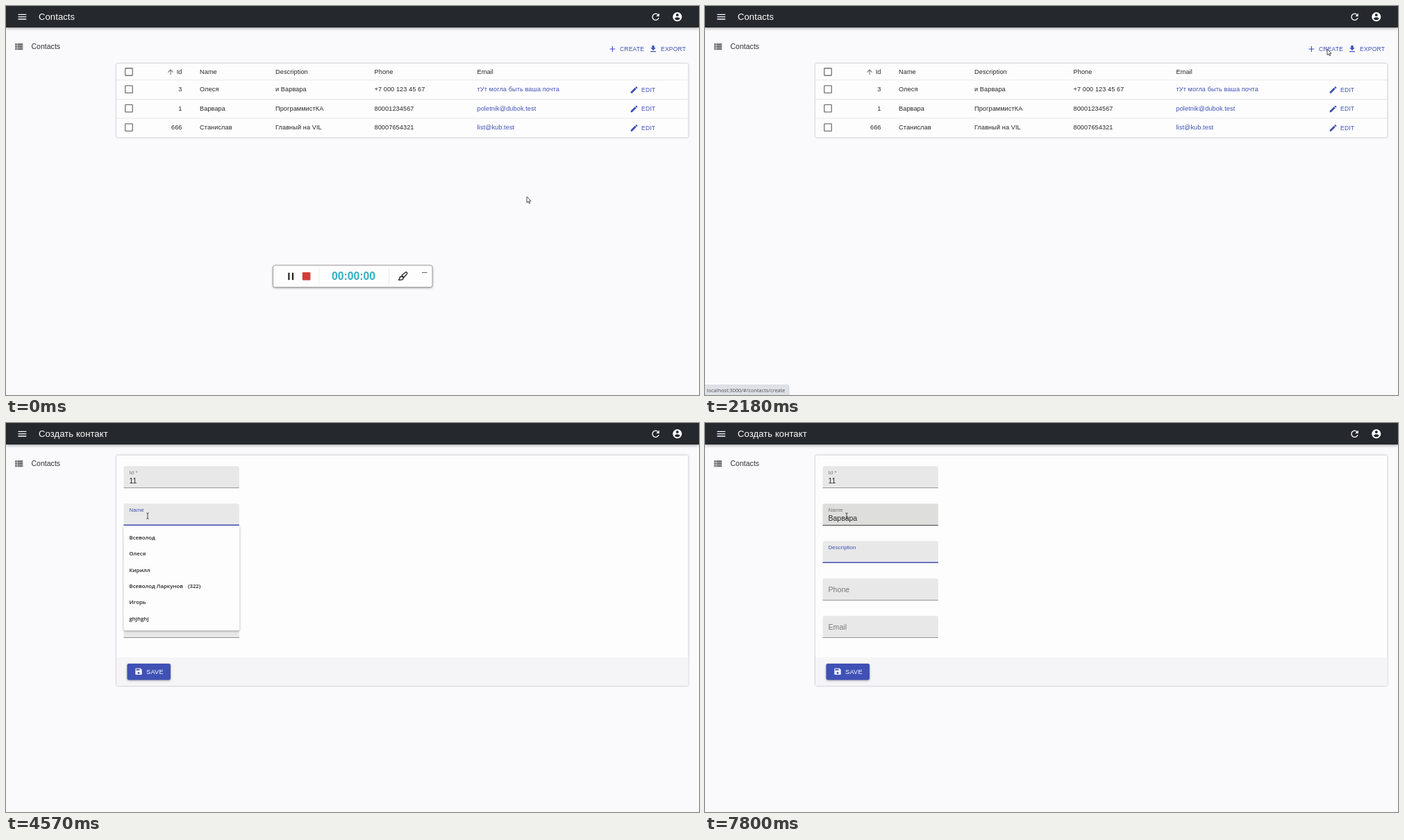
An HTML page for the animation above (8 s loop, 998 by 561 pixels).

```html
<!DOCTYPE html>
<html lang="ru">
<head>
<meta charset="utf-8">
<title>Contacts</title>
<style>
  html, body { margin: 0; height: 100%; overflow: hidden; background: #fafafc; }
  svg { display: block; width: 100vw; height: 100vh; font-family: "Liberation Sans", Arial, sans-serif; }
  text { white-space: pre; }
  .card { filter: drop-shadow(0 .7px .8px rgba(0,0,0,.38)); }
  .pop { filter: drop-shadow(0 1px 1.5px rgba(0,0,0,.35)); }
  .ui { font-family: "Open Sans", "Noto Sans", sans-serif; }
</style>
</head>
<body>
<svg id="stage" viewBox="0 0 998 561" preserveAspectRatio="none"></svg>
<script>
const LOOP = 8000, BLUE = '#3f51b5', INK = '#262626';

const ICONS = {
  menu: 'M3 18h18v-2H3zM3 13h18v-2H3zM3 6v2h18V6z',
  refresh: 'M17.65 6.35C16.2 4.9 14.21 4 12 4c-4.42 0-7.99 3.58-7.99 8s3.57 8 7.99 8c3.73 0 6.84-2.55 7.73-6h-2.08c-.82 2.33-3.04 4-5.65 4-3.31 0-6-2.69-6-6s2.69-6 6-6c1.66 0 3.14.69 4.22 1.78L13 11h7V4z',
  account: 'M12 2a10 10 0 1 0 0 20a10 10 0 1 0 0-20zm0 3a3 3 0 1 1 0 6a3 3 0 1 1 0-6zm0 14.2c-2.5 0-4.71-1.28-6-3.22.03-1.99 4-3.08 6-3.08s5.97 1.09 6 3.08c-1.29 1.94-3.5 3.22-6 3.22z',
  list: 'M4 14h4v-4H4zM4 19h4v-4H4zM4 9h4V5H4zM9 14h12v-4H9zM9 19h12v-4H9zM9 5v4h12V5z',
  edit: 'M3 17.25V21h3.75L17.81 9.94l-3.75-3.75zM20.71 7.04c.39-.39.39-1.02 0-1.41l-2.34-2.34c-.39-.39-1.02-.39-1.41 0l-1.83 1.83 3.75 3.75z',
  add: 'M19 13h-6v6h-2v-6H5v-2h6V5h2v6h6z',
  download: 'M19 9h-4V3H9v6H5l7 7zM5 18v2h14v-2z',
  save: 'M17 3H5c-1.11 0-2 .9-2 2v14c0 1.1.89 2 2 2h14c1.1 0 2-.9 2-2V7zm-5 16a3 3 0 1 1 0-6a3 3 0 1 1 0 6zm3-10H5V5h10z',
  box: 'M19 5v14H5V5h14m0-2H5c-1.1 0-2 .9-2 2v14c0 1.1.9 2 2 2h14c1.1 0 2-.9 2-2V5c0-1.1-.9-2-2-2z',
  up: 'M4 12l1.41 1.41L11 7.83V20h2V7.83l5.58 5.59L20 12l-8-8z'
};

const icon = (name, cx, cy, size, fill) =>
  `<path d="${ICONS[name]}" fill="${fill}" fill-rule="evenodd" transform="translate(${cx - size / 2} ${cy - size / 2}) scale(${size / 24})"/>`;
const rect = (x, y, w, h, fill, more = '') =>
  `<rect x="${x}" y="${y}" width="${w}" height="${h}" fill="${fill}" ${more}/>`;
const text = (x, y, size, fill, str, more = '') =>
  `<text x="${x}" y="${y}" font-size="${size}" fill="${fill}" ${more}>${str}</text>`;
const cell = (x, y, str, fill = INK, more = '') =>
  text(x, y, 9.17, fill, str, 'letter-spacing=".09" ' + more);
const button = (x, y, str) => text(x, y, 8.53, BLUE, str, 'letter-spacing=".2"');

const COLUMNS = [279, 388, 530.5, 678.5];
const ROWS = [
  [3, 'Олеся', 'и Варвара', '+7 000 123 45 67', 'тУт могла быть ваша почта'],
  [1, 'Варвара', 'ПрограммистКА', '80001234567', 'poletnik@dubok.test'],
  [666, 'Станислав', 'Главный на VIL', '80007654321', 'list@kub.test']
];
const rowTop = i => 107 + 27.6 * i;

function line(y, id, name, cells, linkFill) {
  return icon('box', 177, y, 15.75, '#757575') +
    cell(253.5, y + 3.1, id, INK, 'text-anchor="end"') +
    cells.map((s, i) => cell(COLUMNS[i], y + 3.1, s, i === 3 ? linkFill : INK)).join('');
}

function tableView() {
  const rows = ROWS.map(([id, ...cells], i) => {
    const y = 120 + 27.5 * i;
    return rect(159, rowTop(i), 823.5, 27.4, '#f4f4f5', `id="row${i}"`) +
      rect(159, rowTop(i) - .6, 823.5, .8, '#e2e2e3') +
      line(y + .2, id, '', cells, BLUE) +
      icon('edit', 904.6, y + .9, 13.1, BLUE) + button(915, y + 3.9, 'EDIT');
  }).join('');
  return icon('add', 873.4, 62, 13.6, BLUE) + button(884, 65, 'CREATE') +
    icon('download', 932, 61.8, 13.1, BLUE) + button(943, 65, 'EXPORT') +
    rect(159, 83, 823.5, 106.5, '#fdfdfe', 'rx="2.6" class="card"') +
    line(95, 'Id', '', ['Name', 'Description', 'Phone', 'Email'], INK) +
    icon('up', 237, 95.2, 11.8, '#6c6c6c') + rows;
}

const FIELDS = ['Id *', 'Name', 'Description', 'Phone', 'Email'];
const fieldTop = i => 62.3 + 54 * i;

function formView() {
  const fields = FIELDS.map((label, i) => {
    const y = fieldTop(i);
    return `<path id="bg${i}" d="M169.5 ${y + 31.5}v-29q0-2.5 2.5-2.5h161.3q2.5 0 2.5 2.5v29z"/>` +
      rect(169.5, y + 30.8, 166.3, .9, '#8b8b8b', `id="base${i}"`) +
      rect(169.5, y + 30.2, 166.3, 1.5, BLUE, `id="focus${i}"`) +
      text(0, 0, 10.5, '#757575', label, `id="label${i}" letter-spacing=".08"`) +
      text(177.5, y + 24.6, 10.5, INK, '', `id="value${i}"`);
  }).join('');
  return rect(159, 46.5, 823.5, 332.5, '#fdfdfe', 'rx="2.6" class="card"') +
    rect(159, 338, 823.5, 41, '#f5f5f7') + fields +
    rect(174.5, 347, 62.5, 23.4, '#d9d9da', 'rx="2.6"') +
    `<g id="saveOn">${rect(174.5, 347, 62.5, 23.4, BLUE, 'rx="2.6" class="pop"')}</g>` +
    `<g id="saveLabel">${icon('save', 191, 358.4, 12.4, 'currentColor')}` +
    `${text(202, 361.6, 9.2, 'currentColor', 'SAVE', 'letter-spacing=".26"')}</g>` +
    rect(0, 0, .8, 12, '#222', 'id="caret"');
}

const HINTS = ['Всеволод', 'Олеся', 'Кирилл', 'Всеволод Ларкунов', 'Игорь', 'ghjhghj'];
const hint = (s, i) => text(177.5, 167.8 + 23.4 * i, 7.8, '#222', s, 'class="ui" font-weight="600"');
const hints = HINTS.map(hint).join('') +
  text(262, 238, 7.8, '#222', '(322)', 'class="ui" font-weight="600"');

const recorder = rect(384.5, 374, 229.5, 31.5, '#fdfdfe', 'rx="3" stroke="#999" stroke-width=".9" class="pop"') +
  rect(406.3, 384.7, 2.2, 10.4, '#222') + rect(411.9, 384.7, 2.2, 10.4, '#222') +
  rect(426.8, 384, 11.6, 11.6, '#d63c3a', 'rx="1"') +
  rect(450.5, 378, .8, 24, '#eee') + rect(551, 378, .8, 24, '#e4e4e4') +
  text(469, 395.4, 15.75, '#2fafc3', '00:00:00', 'font-weight="700"') +
  `<g fill="none" stroke="#222" stroke-width="1.3" stroke-linejoin="round">
     <path d="M570 388.6l5-4.4q1.4-.9 2.3 0t0 2.3l-4.4 5z"/>
     <path d="M569.6 390q-2.6 0-2.6 2.6l-1.4 2.5q4.6.5 6.2-1.3 1-1.6-.2-3z"/></g>` +
  rect(599, 384, 7.5, .9, '#555');

stage.innerHTML =
  rect(0, 0, 998, 561, '#fafafc') +
  rect(0, 0, 998, 31, '#25282c', 'style="filter:drop-shadow(0 1.3px 2px rgba(0,0,0,.4))"') +
  icon('menu', 23.4, 15.7, 15.75, '#fff') + icon('refresh', 935.6, 15.7, 15.75, '#fff') +
  icon('account', 966.8, 15.6, 15.75, '#fff') +
  text(47, 20.4, 13.1, '#fff', '', 'id="title" letter-spacing=".06"') +
  icon('list', 18.4, 58.6, 15.75, '#707070') +
  text(36.4, 62.3, 10.5, '#303030', 'Contacts', 'letter-spacing=".04"') +
  `<g id="table">${tableView()}</g><g id="form">${formView()}</g>
   <g id="drop">${rect(169.3, 148, 167, 0, '#fdfdfe', 'id="dropBox" rx="2" class="pop"')}
     <g id="allHints">${hints}</g><g id="oneHint">${hint('Варвара', 0)}</g></g>
   <g id="recorder">${recorder}</g>
   <g id="status">${rect(-3, 546.5, 124, 18, '#dee1e6', 'rx="2.5" stroke="#cfd2d8" stroke-width=".6"')}
     ${text(2.6, 556.8, 7.38, '#4a4d52', 'localhost:3000/#/contacts/create', 'class="ui"')}</g>
   <path id="arrow" d="M0 0V8.6L2 6.9L3.3 9.8L4.7 9.2L3.4 6.3H5.9z" fill="#fff" stroke="#222" stroke-width=".8"/>
   <path id="beam" d="M-1.8 -4.2Q0 -4.2 0 -3.2Q0 -4.2 1.8 -4.2M0 -3.2V3.2M-1.8 4.2Q0 4.2 0 3.2Q0 4.2 1.8 4.2" fill="none" stroke="#222" stroke-width=".8"/>`;

const el = {};
stage.querySelectorAll('[id]').forEach(n => el[n.id] = n);

// Pointer stops: time, x, y
const PATH = [
  [130, 750, 275], [710, 848, 107], [960, 893, 63], [1150, 905, 62], [1500, 850, 150],
  [1760, 830, 171], [1810, 830, 171], [2180, 896, 62], [2300, 896, 62],
  [2520, 370, 75], [2640, 370, 75], [2950, 204, 80], [3560, 204, 80], [3920, 204, 134]
];
const OPEN = 2310;
const FOCUS = [[3000, 3980], [3980, 7300], [7300, LOOP]];
const TYPED = [
  ['11', [3480, 3620]],
  ['Варвара', [5160, 5740, 6250, 6460, 6670, 6880, 7090]]
];
const RESETS = [...FOCUS.map(f => f[0]), ...TYPED.flatMap(t => t[1])];

const clamp = v => Math.max(0, Math.min(1, v));
const within = (t, a, b) => t >= a && t < b;
const show = (node, on) => node.setAttribute('display', on ? 'inline' : 'none');
const easeOut = v => 1 - (1 - clamp(v)) ** 3;
const mix = (a, b, k) => a + (b - a) * k;

function pointer(t) {
  const i = PATH.findIndex(p => p[0] > t);
  if (i === 0) return PATH[0].slice(1);
  if (i < 0) return PATH[PATH.length - 1].slice(1);
  const [t0, x0, y0] = PATH[i - 1], [t1, x1, y1] = PATH[i];
  const u = (t - t0) / (t1 - t0), k = u * u * (3 - 2 * u);
  return [mix(x0, x1, k), mix(y0, y1, k)];
}

function drawField(i, t, hovered) {
  const [start, end] = FOCUS[i] || [Infinity, Infinity];
  const focused = within(t, start, end);
  const k = easeOut((t - start) / 200), out = easeOut((t - end) / 200);
  const y = fieldTop(i);
  el['bg' + i].setAttribute('fill', hovered && !focused ? '#dededd' : '#e8e8e8');
  el['base' + i].setAttribute('fill', hovered && !focused ? '#333' : '#8b8b8b');
  const grow = k * (1 - out);
  el['focus' + i].setAttribute('transform', `translate(${252.65 * (1 - grow)} 0) scale(${grow} 1)`);
  const label = el['label' + i];
  label.setAttribute('transform', `translate(177.5 ${y + mix(19.6, 11.5, k)}) scale(${mix(1, .75, k)})`);
  label.setAttribute('fill', focused ? BLUE : '#757575');
  const [str, times] = TYPED[i] || ['', []];
  const value = el['value' + i];
  value.textContent = str.slice(0, times.filter(s => t >= s).length);
  if (focused) {
    const last = Math.max(...RESETS.filter(s => s <= t));
    show(el.caret, Math.floor((t - last) / 500) % 2 === 0);
    const w = value.textContent ? value.getComputedTextLength() : 0;
    el.caret.setAttribute('x', 177.5 + w);
    el.caret.setAttribute('y', y + 14.6);
  }
}

function render(t) {
  const onForm = t >= OPEN, [x, y] = pointer(t);
  el.title.textContent = onForm ? 'Создать контакт' : 'Contacts';
  show(el.table, !onForm);
  show(el.form, onForm);
  show(el.recorder, t < 840);
  show(el.status, within(t, 970, 1280) || within(t, 2130, 2680));

  ROWS.forEach((_, i) => show(el['row' + i], y > rowTop(i) + .3 && y < rowTop(i + 1) && x < 982));

  let overField = false;
  show(el.caret, false);
  FIELDS.forEach((_, i) => {
    const hit = onForm && x > 169 && x < 336 && y > fieldTop(i) && y < fieldTop(i) + 32;
    overField = overField || hit;
    drawField(i, t, hit);
  });

  const saved = clamp((t - 3480) / 250);
  el.saveOn.setAttribute('opacity', saved);
  el.saveLabel.setAttribute('color', saved > .3 ? '#fff' : '#a4a4a5');

  const full = t < 5160;
  show(el.drop, within(t, 4120, 7090));
  show(el.allHints, full);
  show(el.oneHint, !full);
  el.dropBox.setAttribute('height', full ? 151.3 : 34);

  show(el.arrow, !overField);
  show(el.beam, overField);
  for (const n of [el.arrow, el.beam]) n.setAttribute('transform', `translate(${x} ${y})`);
}

const begin = performance.now();
function tick() {
  render((performance.now() - begin) % LOOP);
  requestAnimationFrame(tick);
}
tick();
</script>
</body>
</html>
```
